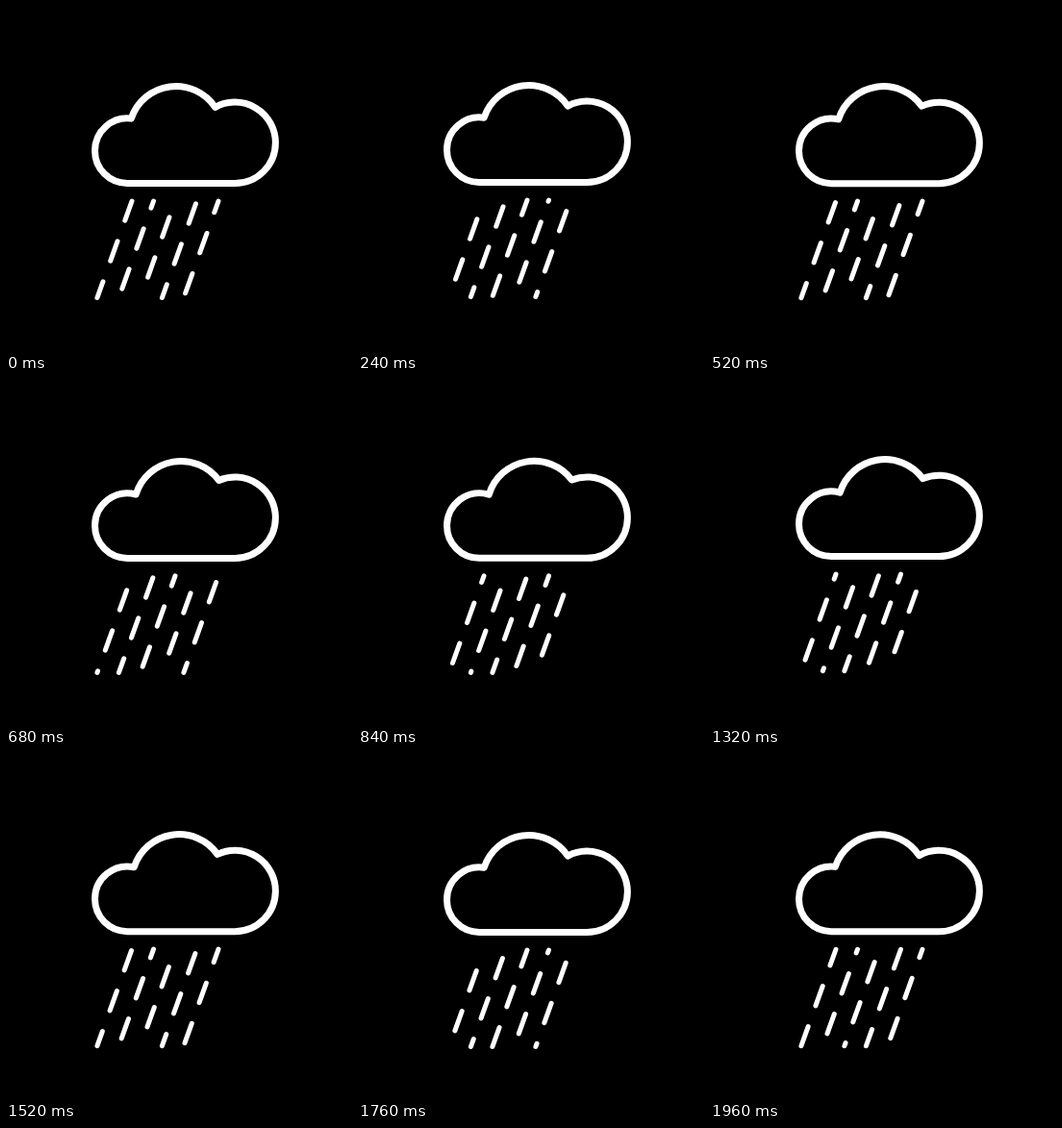
Recreate the animation shown at these times as an HTML page. Size 360x360 px, loop 2000 ms.

```html
<!DOCTYPE html>
<html lang="en">
<head>
<meta charset="utf-8">
<title>Rain cloud</title>
<style>
  html, body { margin: 0; width: 100%; height: 100%; overflow: hidden; background: #000; }
  svg { display: block; width: 100vw; height: 100vh; }
</style>
</head>
<body>
<svg viewBox="0 0 360 360" fill="none" stroke="#fff">
  <g id="scene">
    <path id="cloud" stroke-width="7" stroke-linejoin="round"/>
    <g id="rain" stroke-width="5" stroke-linecap="round"></g>
  </g>
</svg>
<script>
const LOOP = 2000;
const TAU = Math.PI * 2;
const scene = document.getElementById('scene');
const cloud = document.getElementById('cloud');
const rain = document.getElementById('rain');

const left = { x: 126.3, y: 150.7, r: 33.8 };
const right = { x: 238.2, y: 142.3, r: 42.2 };
const middle = { x: 176.8, y: 132.5, r: 49, sway: 6.8 };
const baseY = 184.5;

// Heights are vertical; slant converts them to lengths along a streak.
const top0 = 203, bottom0 = 303.5, lean = 0.359;
const slant = Math.hypot(1, lean);
const dash = 20.3, period = 42, fallTime = 500;
const dashEnds = [223, 210, 240, 226, 214.7];

const streaks = dashEnds.map((end, i) => {
  const line = document.createElementNS('http://www.w3.org/2000/svg', 'line');
  const x = 131 + i * 22.5;
  const attrs = {
    x1: x, y1: top0, x2: x - lean * (bottom0 - top0), y2: bottom0,
    'stroke-dasharray': `${dash * slant} ${(period - dash) * slant}`
  };
  for (const key in attrs) line.setAttribute(key, attrs[key]);
  rain.append(line);
  return { line, start: end - dash - top0 };
});

// Upper crossing point of two circles, a lying to the left of b.
function crossing(a, b) {
  const dx = b.x - a.x, dy = b.y - a.y, d = Math.hypot(dx, dy);
  const along = (a.r * a.r - b.r * b.r + d * d) / (2 * d);
  const off = Math.sqrt(a.r * a.r - along * along);
  return [a.x + (along * dx + off * dy) / d, a.y + (along * dy - off * dx) / d];
}

function cloudPath(shift) {
  const mid = { ...middle, x: middle.x + shift };
  const arc = (r, point) => `A${r} ${r} 0 0 1 ${point}`;
  return `M${left.x} ${baseY}` +
    arc(left.r, [left.x - left.r, left.y]) +
    arc(left.r, crossing(left, mid)) +
    arc(mid.r, crossing(mid, right)) +
    arc(right.r, [right.x + right.r, right.y]) +
    arc(right.r, [right.x, baseY]) + 'Z';
}

function draw(time) {
  const t = time % LOOP;
  const bob = -Math.sin(TAU * t / 1000);
  const shift = middle.sway * (1 - Math.cos(TAU * t / LOOP)) / 2;
  scene.setAttribute('transform', `translate(0 ${bob})`);
  cloud.setAttribute('d', cloudPath(shift));
  for (const { line, start } of streaks) {
    const offset = (start + period * t / fallTime) % period;
    line.setAttribute('stroke-dashoffset', -offset * slant);
  }
}

const began = performance.now();
function tick() {
  draw(performance.now() - began);
  requestAnimationFrame(tick);
}
draw(0);
requestAnimationFrame(tick);
</script>
</body>
</html>
```
